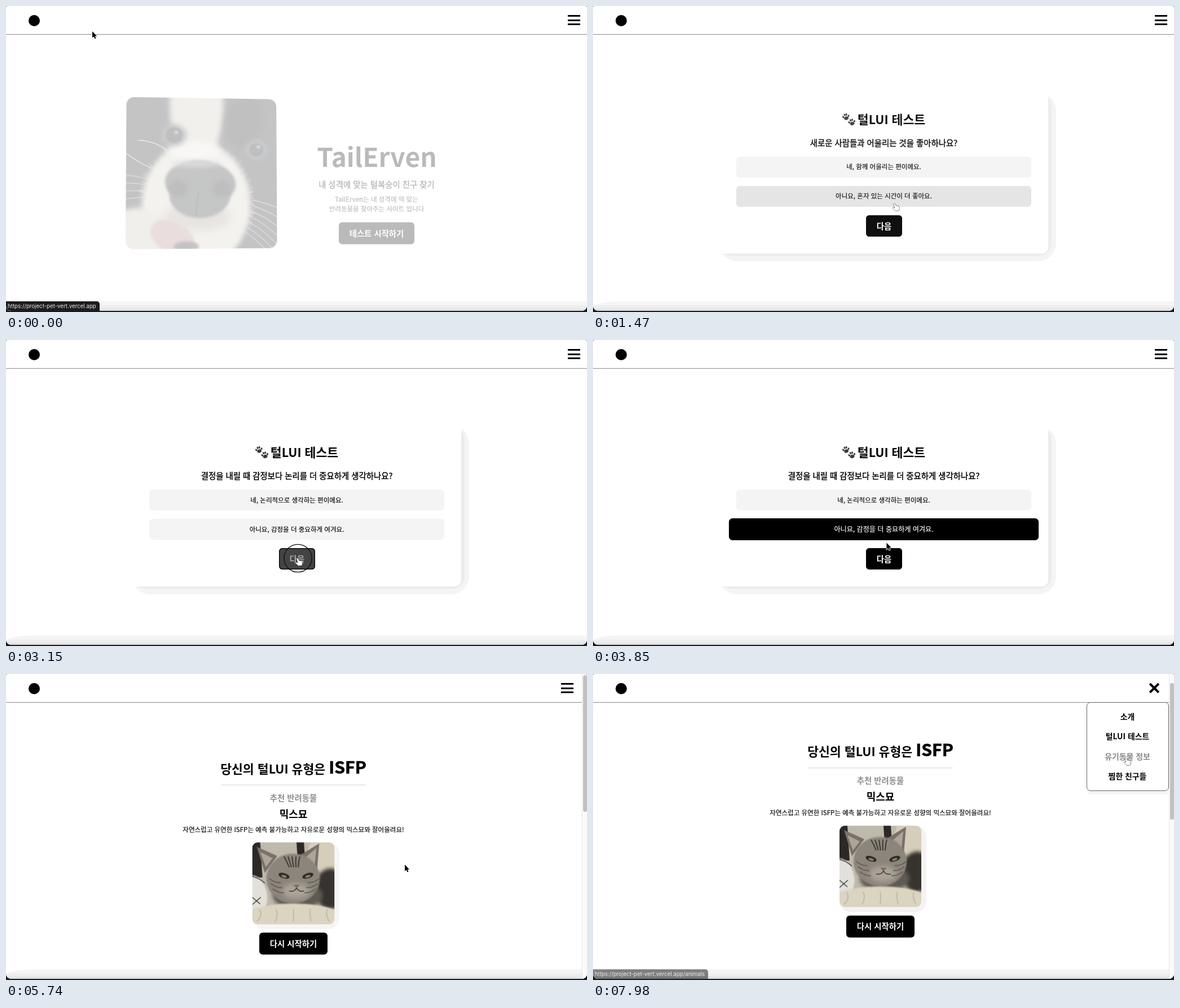
These frames come from a looping animation (1030x544 px, 8 s). An HTML page with a canvas:

```html
<!DOCTYPE html>
<html lang="ko">
<head>
<meta charset="utf-8">
<title>TailErven</title>
<style>
html, body { margin: 0; width: 100%; height: 100%; overflow: hidden; background: #1b1b1c; }
body { position: relative; font-family: "Noto Sans CJK KR", "Noto Sans CJK", "Noto Sans", sans-serif; }
div, canvas { position: absolute; }
.page { left: 0; top: 0; width: 1030px; height: 542px; overflow: hidden; background: #fff; border-radius: 3px 3px 9px 9px; }
.layer { left: 0; top: 0; width: 1030px; height: 542px; }
.text { white-space: nowrap; line-height: 1; transform: translate(-50%, -55.6%); }
.w400 { -webkit-text-stroke: .15px; }
.w500 { -webkit-text-stroke: .4px; }
.w700 { font-weight: 700; }
.type { font-size: 30.2px; line-height: 0; -webkit-text-stroke: .6px; }
.footer { left: 0; top: 525px; width: 1030px; height: 18px; border-radius: 50px 0 0 0 / 10px 0 0 0;
  background: linear-gradient(#f5f5f5 0 7px, #eee 8px 12px, #e3e3e3 14px, #dcdcdc); }
.status { left: 0; top: 525px; height: 17px; padding: 0 6px 0 3px; background: #1d1d1f; color: #ececec;
  border-radius: 0 5px 0 9px; font: 9.7px/18px Inter, sans-serif; white-space: nowrap; }
.menu { box-sizing: border-box; left: 875px; top: 50px; width: 146px; height: 158px; background: #fff;
  border: 1px solid #666; border-radius: 7px; box-shadow: 0 7px 0 -1px #f4f4f4; }
</style>
</head>
<body>
<script>
const LOOP = 8000, MENU = 7130;
const STARTS = [1190, 2250, 3050, 4080, 4770];
const QUIZ = STARTS[0], RESULT = STARTS[4];
const LINK = 'https://project-pet-vert.vercel.app';
const QUESTIONS = [
  ['새로운 사람들과 어울리는 것을 좋아하나요?',
    '네, 함께 어울리는 편이에요.', '아니요, 혼자 있는 시간이 더 좋아요.'],
  ['작업을 할 때 직관적으로 진행하나요, 세부 사항을 꼼꼼히 확인하나요?',
    '직관적으로 진행하는 편이에요.', '세부 사항을 꼼꼼하게 체크하는 편이에요.'],
  ['결정을 내릴 때 감정보다 논리를 더 중요하게 생각하나요?',
    '네, 논리적으로 생각하는 편이에요.', '아니요, 감정을 더 중요하게 여겨요.'],
  ['계획을 세우고 그대로 따르는 편인가요?',
    '네, 계획대로 움직이는 편이에요.', '아니요, 즉흥적으로 움직이는 편이에요.']];

const clamp = (v, a = 0, b = 1) => Math.min(b, Math.max(a, v));
const ramp = (t, start, length) => clamp((t - start) / length);
const smooth = p => p * p * (3 - 2 * p);
const mix = (a, b, p) => a + (b - a) * p;
const gray = v => `rgb(${v},${v},${v})`;

// ---------- building blocks ----------
function add(parent, cls, text = '', tag = 'div') {
  const node = document.createElement(tag);
  node.className = cls;
  node.textContent = text;
  parent.append(node);
  return node;
}
function box(parent, x, y, w, h, r, color) {
  const node = add(parent, '');
  Object.assign(node.style, { left: x + 'px', top: y + 'px', width: w + 'px', height: h + 'px',
    borderRadius: r + 'px', background: color });
  return node;
}
function label(parent, x, y, size, weight, text, color = '#000') {
  const node = add(parent, 'text w' + weight, text);
  Object.assign(node.style, { left: x + 'px', top: y + 'px', fontSize: size + 'px', color });
  return node;
}
function button(parent, x, y, w, h, text) {
  const node = box(parent, x, y, w, h, 6, '#000');
  node.text = label(node, w / 2, h / 2 + .5, 14.4, 700, text, '#fff');
  node.rect = [x, y, w, h];
  return node;
}
function canvas(parent, x, y, w, h, r = 0) {
  const node = add(parent, '', '', 'canvas');
  node.width = w; node.height = h;
  Object.assign(node.style, { left: x + 'px', top: y + 'px', borderRadius: r + 'px' });
  return node.getContext('2d');
}

// ---------- drawing ----------
function oval(c, color, x, y, rx, ry, angle = 0, blur = 0) {
  c.filter = blur ? `blur(${blur}px)` : 'none';
  c.fillStyle = color;
  c.beginPath();
  c.ellipse(x, y, rx, ry, angle, 0, 7);
  c.fill();
  c.filter = 'none';
}
function shape(c, color, path) {
  c.fillStyle = color;
  c.fill(new Path2D(path));
}
function line(c, color, width, path) {
  c.strokeStyle = color;
  c.lineWidth = width;
  c.stroke(new Path2D(path));
}
function seeded(seed) {
  return () => (seed = seed * 16807 % 2147483647) / 2147483647;
}

function drawDog(c) {
  c.fillStyle = '#25272b';
  c.fillRect(0, 0, 268, 268);
  oval(c, '#cdc7bb', 124, 10, 48, 110, 0, 5);
  oval(c, '#16171a', 210, 42, 34, 48, .2, 6);
  oval(c, '#d6d0c4', 124, 190, 96, 112, 0, 4);
  oval(c, '#cbc3b4', 20, 252, 62, 56, 0, 5);
  // Fur around the muzzle
  const rand = seeded(11);
  for (let i = 0; i < 110; i++) {
    const a = Math.PI * (.95 + 1.15 * rand()), r = 1 + .1 * rand(), x = Math.cos(a), y = Math.sin(a);
    line(c, 'rgba(214,208,196,.4)', 1, `M${124 + 92 * x} ${190 + 108 * y}L${124 + 98 * r * x} ${190 + 114 * r * y}`);
  }
  oval(c, '#e6e2d9', 118, 94, 46, 16, 0, 6);
  oval(c, '#a59c8f', 126, 212, 60, 24, 0, 8);
  for (const [x, y, r] of [[84, 67, 15], [231, 92, 13]]) {
    oval(c, '#44474b', x, y, r * 1.5, r * 1.3, 0, 4);
    oval(c, '#131417', x, y, r, r * .95, 0, 1);
    oval(c, '#74787d', x + 4, y - 5, 4, 3, 0, 1);
  }
  oval(c, '#2b2c2f', 131, 152, 63, 40, .06, 2);
  oval(c, '#2b2c2f', 130, 174, 54, 40, 0, 2);
  oval(c, '#8b8b8a', 122, 118, 44, 5, 0, 4);
  for (const side of [-1, 1]) oval(c, '#101113', 130 + 39 * side, 162, 17, 14, -.3 * side, 3);
  line(c, '#17181a', 3, 'M128 168Q122 190 124 210');
  oval(c, '#ad8283', 82, 248, 42, 27, .5, 2);
  oval(c, '#272425', 106, 264, 22, 9, 0, 2);
  for (let i = 0; i < 7; i++) {
    line(c, '#c9c6bf', 1, `M${225 - i * 3} ${182 + i * 9}Q250 ${188 + i * 13} 270 ${196 + i * 17}`);
    if (i < 4) line(c, '#aaa8a3', 1, `M0 ${138 + i * 14}Q20 ${139 + i * 13} 38 ${146 + i * 10}`);
  }
  line(c, '#cfccc5', 1.2, 'M20 77Q48 76 74 96M0 100Q22 116 44 126');
}

function drawCat(c) {
  c.fillStyle = '#beb9ab';
  c.fillRect(0, 0, 145, 145);
  shape(c, '#2b2825', 'M0 0H14L18 62H0ZM78 0H91L93 32H80Z');
  oval(c, '#d6ceba', 138, 18, 40, 38, 0, 1);
  oval(c, '#37332f', 138, 82, 28, 36, 0, 3);
  oval(c, '#e2e0da', 4, 92, 22, 34, -.2, 1);
  oval(c, '#5f5a53', 80, 94, 44, 24, 0, 3);
  shape(c, '#77716a', 'M8 8L44 24L22 54ZM118 2L82 24L114 50Z');
  shape(c, '#b0a398', 'M14 17L36 28L24 44ZM113 10L92 28L110 40Z');
  oval(c, '#8b857b', 72, 64, 47, 44, 0, 1);
  oval(c, '#aaa399', 77, 86, 24, 14, 0, 4);
  for (let i = -2; i <= 2; i++) line(c, '#3e3a36', 2, `M${70 + i * 7} 25Q${71 + i * 5} 34 ${73 + i * 4} 44`);
  for (const side of [-1, 1]) {
    const x = 77 + side * 21;
    for (let i = 0; i < 3; i++)
      line(c, '#57514b', 1.5, `M${74 + side * (44 - i * 3)} ${64 + i * 9}q${-side * 10} 8 ${-side * 20} 7`);
    oval(c, '#2a2825', x, 59, 10, 4.5, -.3 * side);
    oval(c, '#8a866c', x, 60, 5, 2, -.3 * side);
    line(c, '#38332f', 1.5, `M78 80Q${78 + 3 * side} 88 ${78 + 13 * side} 86`);
  }
  shape(c, '#8b655a', 'M72 75H84L78 81Z');
  oval(c, '#dbd4c1', 72, 150, 110, 42, 0, 1);
  for (let i = 0; i < 5; i++) line(c, '#c2baa5', 2, `M${12 + i * 30} 118Q${20 + i * 27} 128 ${8 + i * 32} 140`);
  line(c, '#2d2d2f', 1.3, 'M0 97L14 109M0 110L15 97M0 60Q14 64 22 72');
}

function drawPaw(c, x, y) {
  c.save();
  c.translate(x, y);
  c.rotate(-.25);
  oval(c, '#3a3a3a', 0, 2.6, 3.9, 3);
  for (let i = -1.5; i < 2; i++) oval(c, '#3a3a3a', i * 3.2, i * i * 1.6 - 4.2, 1.5, 2.1, i * .25);
  c.restore();
}

const ARROW = new Path2D('M0 0V11.6L2.7 9.2L4.5 13.2L6.4 12.4L4.7 8.5H8.2Z');
const HAND = new Path2D('M-1.6 .8Q-.2 -1.2 1 .8L2.4 4.6L4 4.2L5.4 5L6.8 4.8Q8.4 5.4 8.4 8L7.8 12.6L1.6 13.6L-3.2 9Q-4 7 -2 7.2L.4 8.4Z');
function drawPointer(c, [x, y], hand, ring) {
  c.clearRect(0, 0, 1030, 544);
  c.save();
  c.translate(x, y);
  if (ring) {
    c.strokeStyle = '#111';
    c.lineWidth = 1.4;
    c.beginPath();
    c.arc(.5, 0, 24.6, 0, 7);
    c.stroke();
  }
  c.lineWidth = hand ? 1 : 1.6;
  c.strokeStyle = hand ? '#111' : '#fff';
  c.fillStyle = hand ? '#fff' : '#000';
  c.stroke(hand ? HAND : ARROW);
  c.fill(hand ? HAND : ARROW);
  c.restore();
}

// ---------- page ----------
const page = add(document.body, 'page');
add(page, 'footer');

const intro = add(page, 'layer');
const photo = box(intro, 239, 160.5, 268, 268, 14, 'none');
const photoShade = box(photo, 0, 0, 282, 282, 30, '#f4f4f4');
drawDog(canvas(photo, 0, 0, 268, 268, 14));
const words = add(intro, 'layer');
label(words, 657.5, 238, 46, 700, 'TailErven');
label(words, 657, 287, 14.4, 500, '내 성격에 맞는 털복숭이 친구 찾기');
label(words, 657, 314, 11.52, 400, 'TailErven는 내 성격에 딱 맞는');
label(words, 657, 331, 11.52, 400, '반려동물을 찾아주는 사이트 입니다');
const startButton = button(words, 590, 354, 134, 39, '테스트 시작하기');

const quiz = add(page, 'layer');
box(quiz, 223, 152, 598, 300, 32, '#f4f4f4');
box(quiz, 225, 154, 588, 288, 22, '#ebebeb');
box(quiz, 220, 148, 586.5, 289.5, 11, '#fff');
const paws = canvas(quiz, 441, 187, 28, 26);
drawPaw(paws, 7.5, 8);
drawPaw(paws, 18, 17.5);
label(quiz, 529, 200, 21.6, 700, '털LUI 테스트');
const question = label(quiz, 515.5, 241.5, 14.4, 500, '');
const options = [266, 318].map(y => {
  const node = box(quiz, 254, y, 523, 37, 6, '#f4f4f4');
  node.text = label(node, 261.5, 19, 11.52, 400, '');
  node.rect = [254, y, 523, 37];
  return node;
});
const nextButton = button(quiz, 484, 370, 64, 38, '다음');
nextButton.style.boxShadow = 'inset 0 0 0 1.3px #000';

const result = add(page, 'layer');
const heading = label(result, 509.5, 169, 21.6, 700, '당신의 털LUI 유형은 ');
add(heading, 'type', 'ISFP', 'span');
box(result, 381, 197, 257, 1, 0, '#d2d2d2');
label(result, 509.5, 220.5, 14.4, 700, '추천 반려동물', '#8e8e8e');
label(result, 509.5, 248.5, 18, 700, '믹스묘');
label(result, 509.5, 277.5, 11.52, 400, '자연스럽고 유연한 ISFP는 예측 불가능하고 자유로운 성향의 믹스묘와 잘어울려요!');
const catShade = box(result, 437, 300, 154, 154, 20, '#f3f3f3');
const cat = canvas(result, 437, 300, 145, 145, 10);
drawCat(cat);
button(result, 449, 460, 121, 38.5, '다시 시작하기');

box(page, 0, 0, 1030, 50, 0, '#fff');
box(page, 0, 50, 1030, 1, 0, '#8a8a8a');
box(page, 40, 16, 20, 20, 10, '#000');
const icon = add(page, '');
const bars = [0, 1, 2].map(i => box(icon, 0, 16 + i * 7.5, 22, 3, 0, '#000'));
const cross = [45, -45].map(a => {
  const node = box(icon, 0, 23, 22, 4, 0, '#000');
  node.style.transform = `rotate(${a}deg)`;
  return node;
});

const menu = add(page, 'menu');
const items = ['소개', '털LUI 테스트', '유기동물 정보', '찜한 친구들'].map((text, i) => {
  const y = 76.5 + i * 35.5, node = label(menu, 71.5, y - 51, 13.9, 700, text);
  node.rect = [885, y - 15, 125, 30];
  return node;
});

const bar = box(page, 1020.5, 0, 10, 542, 0, '#fafafa');
bar.style.boxShadow = 'inset 1px 0 #e6e6e6';
const thumb = box(bar, 2.5, 2, 6.5, 243, 4, '#c1c1c1');
const status = add(page, 'status');
const pointer = canvas(document.body, 0, 0, 1030, 544);

// ---------- pointer: each stop is [arrival, x, y] ----------
const pickTime = i => STARTS[i] + 370;
const stops = [[0, 153, 45], [400, 661, 410], [900, 655, 378]];
const clicks = [1050];
QUESTIONS.forEach((_, i) => {
  stops.push([pickTime(i) - 50, 522, 348], [STARTS[i + 1] - 125, 517, 388]);
  clicks.push(pickTime(i) - 80, STARTS[i + 1] - 80);
});
stops.push([4900, 519, 392], [5700, 707, 339], [6860, 999, 25], [7700, 945, 149]);
clicks.push(7000);

function cursor(t) {
  const i = stops.findIndex(s => t < s[0]);
  if (i < 1) return (i ? stops[stops.length - 1] : stops[0]).slice(1);
  const [, x0, y0] = stops[i - 1], [end, x1, y1] = stops[i];
  const travel = Math.min(150 + .4 * Math.hypot(x1 - x0, y1 - y0), end - stops[i - 1][0]);
  const p = smooth(ramp(t, end - travel, travel));
  return [mix(x0, x1, p), mix(y0, y1, p)];
}
const inside = ([x, y], [left, top, w, h]) => x >= left && x <= left + w && y >= top && y <= top + h;
// Hover amount with a lag, from the pointer's recent past
function hover(t, rect) {
  let sum = 0;
  for (let i = 0; i < 10; i++) sum += inside(cursor(Math.max(0, t - i * 25)), rect);
  return sum / 10;
}
function tint(t, node) {
  const h = hover(t, node.rect);
  node.style.backgroundColor = gray(mix(0, 68, h));
  node.text.style.color = gray(mix(255, 170, h));
}
const show = (node, on) => { node.style.display = on ? '' : 'none'; };

// ---------- scenes ----------
function drawIntro(t, [x, y]) {
  const p = ramp(t, -135, 500), rest = 1 - p;
  intro.style.opacity = p;
  words.style.transform = `translateY(${42 * rest}px)`;
  photoShade.style.opacity = p;
  const ry = -5 * clamp((x - 400) / 200, -1, 1), rx = 2.4 * clamp((230 - y) / 180, -1, 1);
  photo.style.transform =
    `translate(${-34.5 * rest}px, ${2.5 * rest}px) perspective(1000px) rotateX(${rx}deg) rotateY(${ry}deg)`;
  tint(t, startButton);
}

function drawQuiz(t, at) {
  const p = ramp(t, QUIZ, 300);
  quiz.style.opacity = p;
  quiz.style.transform = `translateY(${30 * (1 - p)}px)`;
  const n = STARTS.filter(s => t >= s).length - 1;
  const [ask, ...answers] = QUESTIONS[n];
  question.textContent = ask;
  options.forEach((node, i) => {
    const picked = i ? smooth(ramp(t, pickTime(n), 200)) : 0;
    node.text.textContent = answers[i];
    node.style.backgroundColor = gray(mix(inside(at, node.rect) ? 228 : 244, 0, picked));
    node.text.style.color = gray(mix(0, 255, picked));
    node.style.transform = `scale(${1 + .05 * picked})`;
  });
  tint(t, nextButton);
}

function drawResult(t) {
  const p = ramp(t, RESULT, 500);
  const scroll = 30.5 * (1 - (1 - ramp(t, 5740, 210)) ** 2);
  result.style.opacity = p;
  result.style.transform = `translateY(${57 * (1 - p) - scroll}px)`;
  const h = hover(t, [437, 300, 145, 145]);
  cat.canvas.style.transform = `scale(${1 + .034 * h})`;
  catShade.style.opacity = 1 - h;
  thumb.style.top = 2 + scroll * .46 + 'px';
}

function drawStatus(t) {
  const early = 1 - ramp(t, 140, 140);
  const middle = ramp(t, 950, 100) * (1 - ramp(t, 1260, 140));
  const late = ramp(t, 7900, 150);
  status.textContent = LINK + (late ? '/animals' : middle ? '/test' : '');
  status.style.opacity = Math.max(early, middle, late);
}

function render(t) {
  const at = cursor(t);
  const inIntro = t < QUIZ, inResult = t >= RESULT, inQuiz = !inIntro && !inResult, open = t >= MENU;
  show(intro, inIntro);
  show(quiz, inQuiz);
  show(result, inResult);
  show(bar, inResult);
  if (inIntro) drawIntro(t, at);
  if (inQuiz) drawQuiz(t, at);
  if (inResult) drawResult(t);
  drawStatus(t);

  const iconX = inResult ? 984 : 996;
  icon.style.left = iconX + 'px';
  bars.forEach(node => show(node, !open));
  cross.forEach(node => show(node, open));
  menu.style.opacity = ramp(t, MENU, 150);
  items.forEach(node => { node.style.color = open && inside(at, node.rect) ? '#888' : '#000'; });

  const targets = inIntro ? [startButton] : inQuiz ? [...options, nextButton] : open ? items : [];
  const rects = [[iconX, 14, 22, 22], ...targets.map(node => node.rect)];
  const hand = rects.some(rect => inside(at, rect));
  drawPointer(pointer, at, hand, clicks.some(c => t >= c && t < c + 200));
}

const start = performance.now();
function tick() {
  render((performance.now() - start) % LOOP);
  requestAnimationFrame(tick);
}
tick();
</script>
</body>
</html>
```
